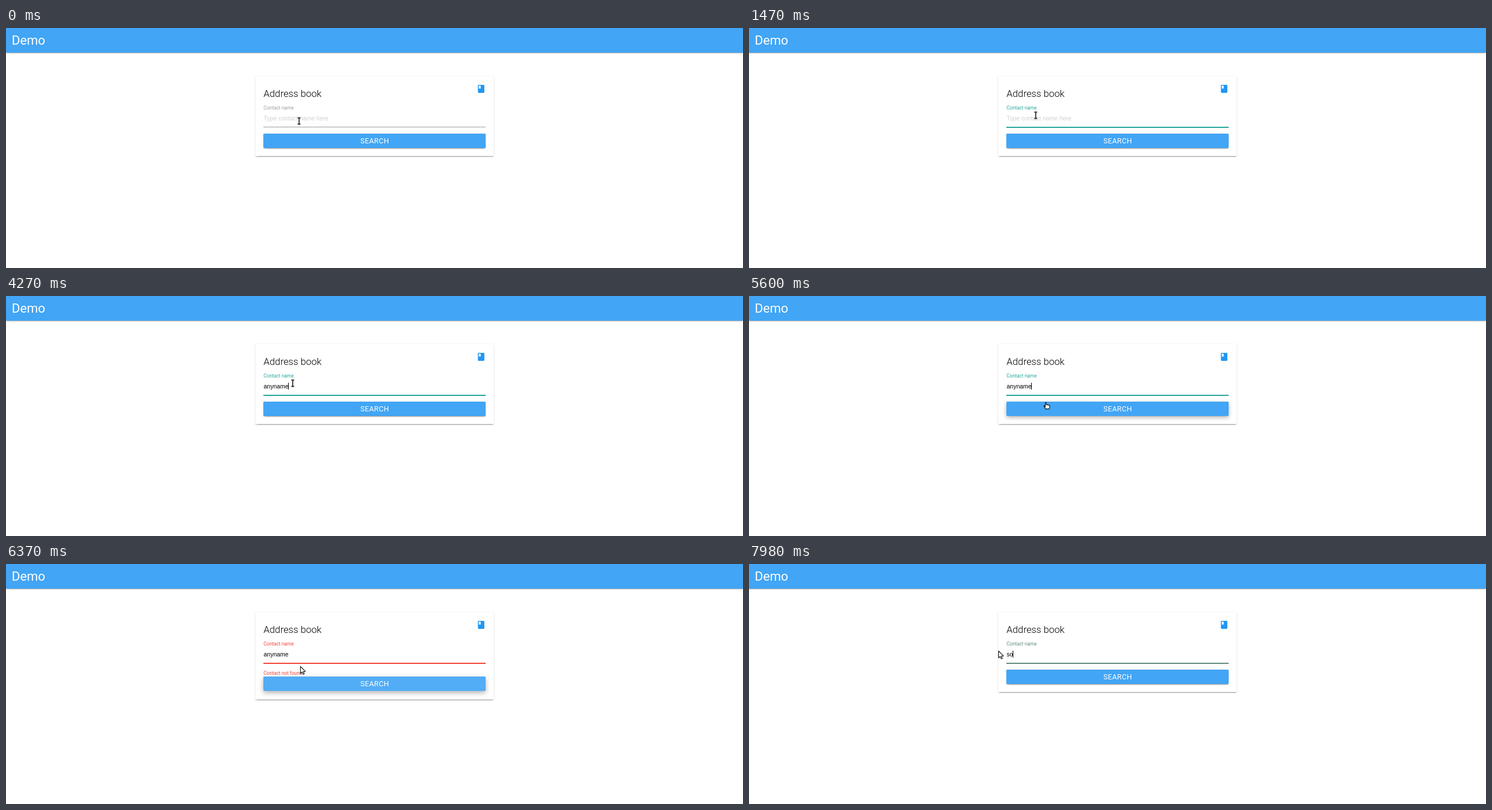
Animation of 1280 by 418 pixels, one loop 8 s. Source, as an HTML page:

```html
<!DOCTYPE html>
<html lang="en">
<head>
<meta charset="utf-8">
<title>Address book</title>
<style>
  html, body { margin: 0; width: 100%; height: 100%; overflow: hidden; background: #fff; }
  #stage { position: relative; width: 1280px; height: 418px; overflow: hidden; }
  #stage > * { position: absolute; }
  #bar, #card {
    box-shadow: 0 1.4px 1.4px rgba(0,0,0,.14), 0 .7px 3.5px rgba(0,0,0,.12), 0 2.1px .7px -1.4px rgba(0,0,0,.2);
  }
  #bar { left: 0; top: -2px; width: 1280px; height: 45.4px; background: #42a5f5; }
  #card { left: 433.3px; top: 84px; width: 413.7px; background: #fff; border-radius: 1.4px; }
  #btn { left: 447.3px; width: 385.7px; height: 25.2px; background: #42a5f5; border-radius: 1.4px; overflow: hidden; }
  #ripple { position: absolute; border-radius: 50%; background: #fff; }
  svg { left: 0; top: 0; }
  text { font-family: Roboto, sans-serif; }
  .field { font-family: "Liberation Sans", Arial, sans-serif; font-size: 10.5px; }
  .small { font-size: 8.4px; }
</style>
</head>
<body>
<div id="stage">
  <div id="bar"></div>
  <div id="card"></div>
  <div id="btn"><div id="ripple"></div></div>
  <svg width="1280" height="418" viewBox="0 0 1280 418">
    <text x="10" y="28.6" font-size="22.05" fill="#fff">Demo</text>
    <text x="447.3" y="120" font-size="16.8" font-weight="300">Address book</text>
    <path transform="translate(816.8 97.6) scale(.7)" fill="#2196f3" d="M18 2H6c-1.1 0-2 .9-2 2v16c0 1.1.9 2 2 2h12c1.1 0 2-.9 2-2V4c0-1.1-.9-2-2-2zM6 4h5v8l-2.5-1.5L6 12V4z"/>
    <text id="label" class="small" x="447.3" y="142">Contact name</text>
    <rect id="line" x="447" y="172" width="386" height="1"/>
    <rect id="glow" x="447" y="173" width="386" height="1"/>
    <text id="hint" class="field" x="447.5" y="161" fill="#d1d1d1">Type contact name here</text>
    <rect id="mark" x="447" y="151" width="44" height="12" fill="#f07746"/>
    <text id="value" class="field" x="447.5" y="161"></text>
    <rect id="caret" y="151" width="1" height="12"/>
    <text id="error" class="small" x="447.3" y="193" fill="#f44336">Contact not found</text>
    <text id="search" x="640.4" font-size="12.6" letter-spacing=".35" text-anchor="middle" fill="#fff">SEARCH</text>
    <g id="pointer">
      <path id="beam" d="M-2.5-5.5H2.5M-2.5 5.5H2.5M0-5.5V5.5" fill="none" stroke="#333" stroke-width="1.8"/>
      <path id="arrow" d="M.4.5V12.6L3.2 10L5.2 14.2L7.1 13.3L5.2 9.2H9Z" fill="#fff" stroke="#111" stroke-width="1.1" stroke-linejoin="round"/>
      <path id="hand" d="M-1.9 2.6V-4.2Q-1.9-5.2-1-5.2T-.1-4.2V-1.2L4.4-.4Q5.8 0 5.8 1.4Q5.8 4.6 4.4 6.2H-1.4Q-2.4 3.8-4.4 1.6Q-4.6.2-3.2.4Z" fill="#fff" stroke="#111" stroke-width="1.2" stroke-linejoin="round"/>
    </g>
  </svg>
</div>
<script>
const LOOP = 8000, STEP = 70;
const FOCUS = 840, HOVER = 5460, PRESS = 5740, FAIL = 5880, REFOCUS = 6440, SELECT = 6860, RETYPE = 7840;
const GRAY = [158, 158, 158, 1], TEAL = [38, 166, 154, 1], RED = [244, 67, 54, 1], CLEAR = [158, 158, 158, 0];

const typed = [[0, ''], [1750, 'a'], [1890, 'an'], [2100, 'ann'], [2940, 'an'], [3290, 'any'], [3920, 'anyn'],
  [4060, 'anyna'], [4130, 'anynam'], [4270, 'anyname'], [RETYPE, 's'], [7980, 'so']];
const blinkStarts = [FOCUS, 1750, 1890, 2100, 3290, 3920, 4060, 4130, 4270, REFOCUS, RETYPE, 7980];

// start, end, x, y
const moves = [[350, 700, 498, 152], [5180, 5530, 516.5, 190.5], [6160, 6370, 511, 178],
  [6370, 6440, 512, 157], [6930, 7140, 433, 151]];

const labelKeys = [[FOCUS, TEAL], [PRESS, GRAY], [5900, RED], [RETYPE, TEAL]];
const lineKeys = [[FOCUS, TEAL], [PRESS, GRAY], [5950, RED], [RETYPE, TEAL]];
const glowKeys = [[FOCUS, TEAL], [PRESS, CLEAR], [5950, RED], [RETYPE, TEAL]];

// y, blur, spread, alpha
const restShadow = [[1.4, 1.4, 0, .14], [.7, 3.5, 0, .12], [2.1, .7, -1.4, .2]];
const hoverShadow = [[3.5, 7.7, 0, .18], [2.8, 10.5, 0, .15], [2.1, .7, -1.4, 0]];

const el = {};
document.querySelectorAll('[id]').forEach(n => el[n.id] = n);

const progress = (t, from, span) => Math.min(1, Math.max(0, (t - from) / span));
const easeOut = p => 1 - (1 - p) ** 2;
const smooth = p => p * p * (3 - 2 * p);
const mix = (a, b, p) => a.map((v, i) => v + (b[i] - v) * p);
const show = (node, on) => node.style.display = on ? '' : 'none';
const last = (list, ok) => list.filter(ok).pop();

function fade(keys, start, t) {
  const c = keys.reduce((now, [at, to]) => mix(now, to, easeOut(progress(t, at, 300))), start);
  return `rgba(${c.map(v => v.toFixed(3))})`;
}

function drawField(t) {
  const text = last(typed, k => k[0] <= t)[1];
  const selected = t >= SELECT && t < RETYPE;
  const focused = (t >= FOCUS && t < PRESS) || t >= REFOCUS;
  const blink = last(blinkStarts, s => s <= t);
  el.value.textContent = text;
  el.value.setAttribute('fill', selected ? '#fff' : '#000');
  show(el.hint, !text);
  show(el.mark, selected);
  show(el.caret, focused && !selected && Math.floor((t - blink) / 600) % 2 === 0);
  el.caret.setAttribute('x', Math.floor(447.5 + (text ? el.value.getComputedTextLength() : 0)));
  el.label.setAttribute('fill', fade(labelKeys, GRAY, t));
  el.line.setAttribute('fill', fade(lineKeys, GRAY, t));
  el.glow.setAttribute('fill', fade(glowKeys, CLEAR, t));
}

function drawButton(t, failed) {
  const shift = failed ? 12.5 : 0;
  const lift = easeOut(progress(t, HOVER, 300)) * (1 - easeOut(progress(t, REFOCUS, 200)));
  const radius = Math.max(0, t - PRESS) * .745;
  show(el.error, failed);
  el.card.style.height = 139 + shift + 'px';
  el.btn.style.top = 183.8 + shift + 'px';
  el.search.setAttribute('y', 200.8 + shift);
  el.btn.style.boxShadow = restShadow.map((s, i) => {
    const [y, blur, spread, alpha] = mix(s, hoverShadow[i], lift);
    return `0 ${y}px ${blur}px ${spread}px rgba(0,0,0,${alpha})`;
  }).join();
  Object.assign(el.ripple.style, {
    left: 69 - radius + 'px', top: 6.5 - radius + 'px',
    width: 2 * radius + 'px', height: 2 * radius + 'px',
    opacity: .19 * (1 - progress(t, 6090, 500))
  });
}

function drawPointer(t, failed) {
  const [x, y] = moves.reduce((p, [from, to, ...end]) =>
    mix(p, end, smooth(progress(t, from, to - from))), [509, 162]);
  const overText = x > 447 && (y < 174 || (failed && y > 185));
  const overButton = !failed && y >= 184;
  show(el.beam, overText && !overButton);
  show(el.hand, overButton);
  show(el.arrow, !overText && !overButton);
  el.pointer.setAttribute('transform', `translate(${x} ${y})`);
}

function draw(time) {
  const t = Math.floor((time % LOOP) / STEP) * STEP;
  const failed = t >= FAIL && t < RETYPE;
  drawField(t);
  drawButton(t, failed);
  drawPointer(t, failed);
}

const begin = performance.now();
function tick() {
  draw(performance.now() - begin);
  requestAnimationFrame(tick);
}
tick();
</script>
</body>
</html>
```
